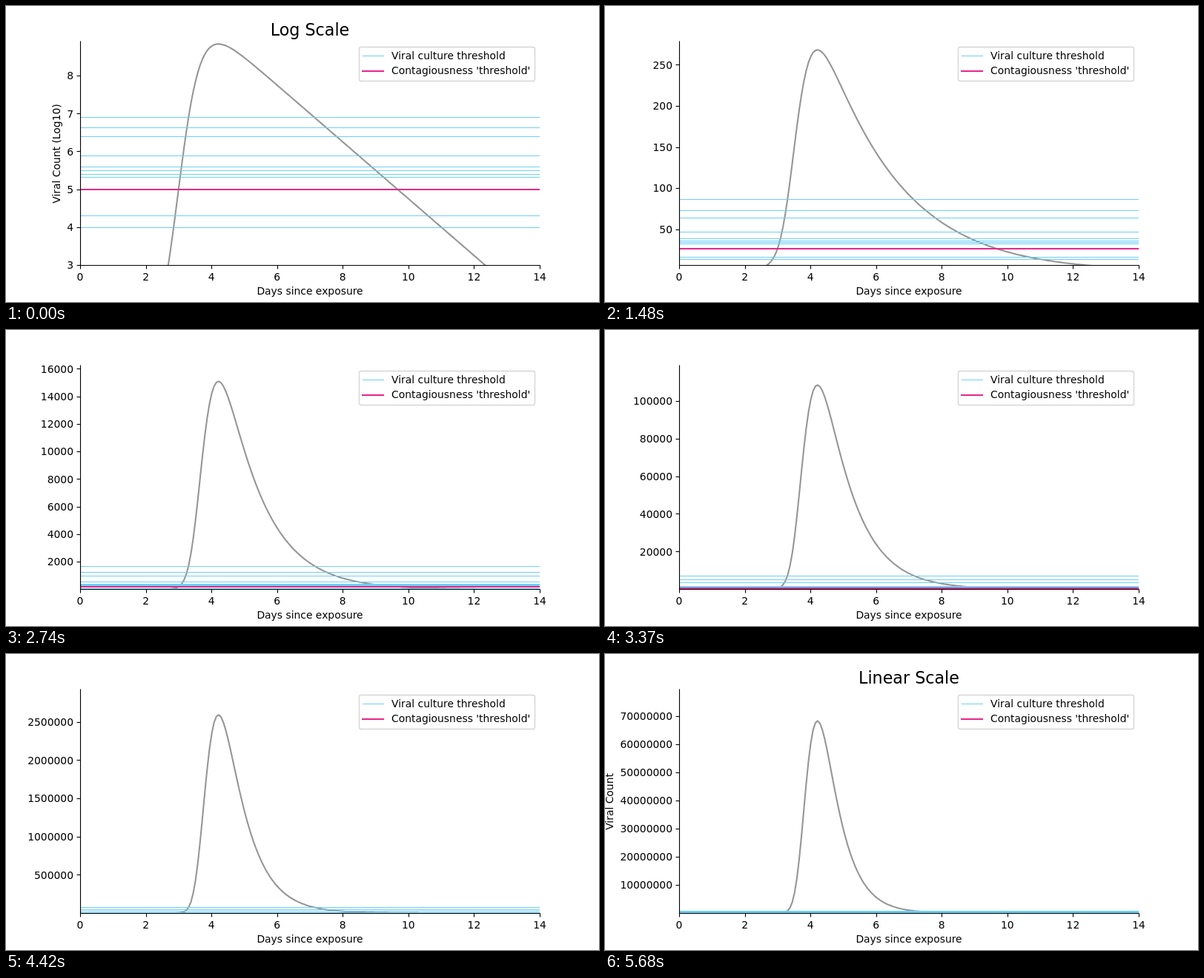
These frames come from a looping animation (800x400 px, 8 s). An HTML page with a canvas:

```html
<!DOCTYPE html>
<html>
<head>
<meta charset="utf-8">
<style>
html, body { margin: 0; overflow: hidden; background: #fff; }
canvas { display: block; }
</style>
</head>
<body>
<canvas id="stage" width="800" height="400"></canvas>
<script>
const ctx = document.getElementById('stage').getContext('2d');
const LOOP = 8000, HOLD = 500, STEP_MS = 70, STEPS = 75;
const LEFT = 100, RIGHT = 720, TOP = 48, BOTTOM = 350;
const LOG_MIN = 3, LOG_MAX = 8.9, DAYS = 14, SAMPLES = 200;
const GRAY = '#969696', PINK = '#e7298a', BLUE = '#6dcff6';
const thresholds = [6.9, 6.63, 6.4, 5.89, 5.6, 5.5, 5.4, 5.32, 4.3, 4];

const xOf = day => LEFT + (RIGHT - LEFT) * day / DAYS;
const logLoad = day => 0.3 + (11.95 - 0.75 * day) / (1 + Math.exp(-2.94 * (day - 3.02)));
// Blends log scale (s = 0) into linear scale (s = 1).
const blend = (v, s) => 10 ** (s * (v - 1)) * (v * (1 - s) + s);
const snap = p => Math.round(p) + 0.5;

function line(x1, y1, x2, y2, color = '#000', width = 1, cap = 'butt') {
  ctx.strokeStyle = color;
  ctx.lineWidth = width;
  ctx.lineCap = cap;
  ctx.beginPath();
  ctx.moveTo(x1, y1);
  ctx.lineTo(x2, y2);
  ctx.stroke();
}

function text(str, x, y, align = 'center', size = 13.89) {
  ctx.font = size + 'px "DejaVu Sans", sans-serif';
  ctx.textAlign = align;
  ctx.fillStyle = '#000';
  ctx.fillText(str, x, y);
}

function sideLabel(str, x) {
  ctx.save();
  ctx.translate(x, 199.5);
  ctx.rotate(-Math.PI / 2);
  text(str, 0, 0);
  ctx.restore();
}

// Smallest round step that gives at most nine intervals.
function tickStep(range) {
  const raw = range / 9, unit = 10 ** Math.floor(Math.log10(raw));
  return unit * [1, 2, 2.5, 5, 10].find(m => m * unit >= raw - 1e-9);
}

function drawAxes(lo, hi, yOf) {
  const x0 = snap(LEFT), y0 = snap(BOTTOM), width = 1.11;
  line(x0, TOP, x0, y0, '#000', width, 'square');
  line(x0, y0, RIGHT, y0, '#000', width, 'square');
  for (let day = 0; day <= DAYS; day += 2) {
    const x = snap(xOf(day));
    line(x, y0, x, y0 + 5, '#000', width);
    text(day, xOf(day), 371);
  }
  const step = tickStep(hi - lo);
  for (let i = Math.ceil(lo / step - 1e-9); i * step <= hi; i++) {
    const y = yOf(i * step);
    line(x0 - 5, snap(y), x0, snap(y), '#000', width);
    text((i * step).toFixed(step % 1 ? 1 : 0), 91, Math.round(y + 5.3), 'right');
  }
  text('Days since exposure', 410, 390);
}

function drawLegend() {
  ctx.beginPath();
  ctx.roundRect(476.5, 55.5, 237, 46, 2.8);
  ctx.fillStyle = 'rgba(255,255,255,0.8)';
  ctx.fill();
  ctx.strokeStyle = 'rgba(204,204,204,0.8)';
  ctx.lineWidth = 1.39;
  ctx.stroke();
  line(481.5, 67.5, 509.5, 67.5, BLUE, 1.04, 'square');
  line(481, 88, 509, 88, PINK, 2.08, 'square');
  text('Viral culture threshold', 520, 72, 'left');
  text("Contagiousness 'threshold'", 520, 92, 'left');
}

function drawPlot(s, yOf) {
  ctx.save();
  ctx.beginPath();
  ctx.rect(LEFT, TOP, RIGHT - LEFT, BOTTOM - TOP);
  ctx.clip();
  ctx.beginPath();
  for (let i = 0; i < SAMPLES; i++) {
    const day = DAYS * i / (SAMPLES - 1);
    ctx.lineTo(xOf(day), yOf(blend(logLoad(day), s)));
  }
  ctx.strokeStyle = GRAY;
  ctx.lineWidth = 2.08;
  ctx.lineJoin = 'round';
  ctx.stroke();
  for (const v of thresholds) {
    const y = snap(yOf(blend(v, s)));
    line(LEFT, y, RIGHT, y, BLUE, 1.04);
  }
  const limit = yOf(blend(5, s));
  if (limit < BOTTOM - 0.4) line(LEFT, Math.round(limit), RIGHT, Math.round(limit), PINK, 2.08);
  ctx.restore();
}

function draw(t) {
  const step = Math.floor((t - HOLD) / STEP_MS) + 1;
  const s = Math.min(Math.max(step, 0), STEPS) / STEPS;
  const lo = blend(LOG_MIN, s), hi = blend(LOG_MAX, s);
  const yOf = value => BOTTOM - (BOTTOM - TOP) * (value - lo) / (hi - lo);

  ctx.fillStyle = '#fff';
  ctx.fillRect(0, 0, 800, 400);
  drawPlot(s, yOf);
  drawAxes(lo, hi, yOf);
  drawLegend();
  if (s === 0) {
    text('Log Scale', 410, 40, 'center', 22.22);
    sideLabel('Viral Count (Log10)', 73);
  } else if (s === 1) {
    text('Linear Scale', 410, 40, 'center', 22.22);
    sideLabel('Viral Count', 11);
  }
}

const start = performance.now();
function frame() {
  draw((performance.now() - start) % LOOP);
  requestAnimationFrame(frame);
}
frame();
</script>
</body>
</html>
```
